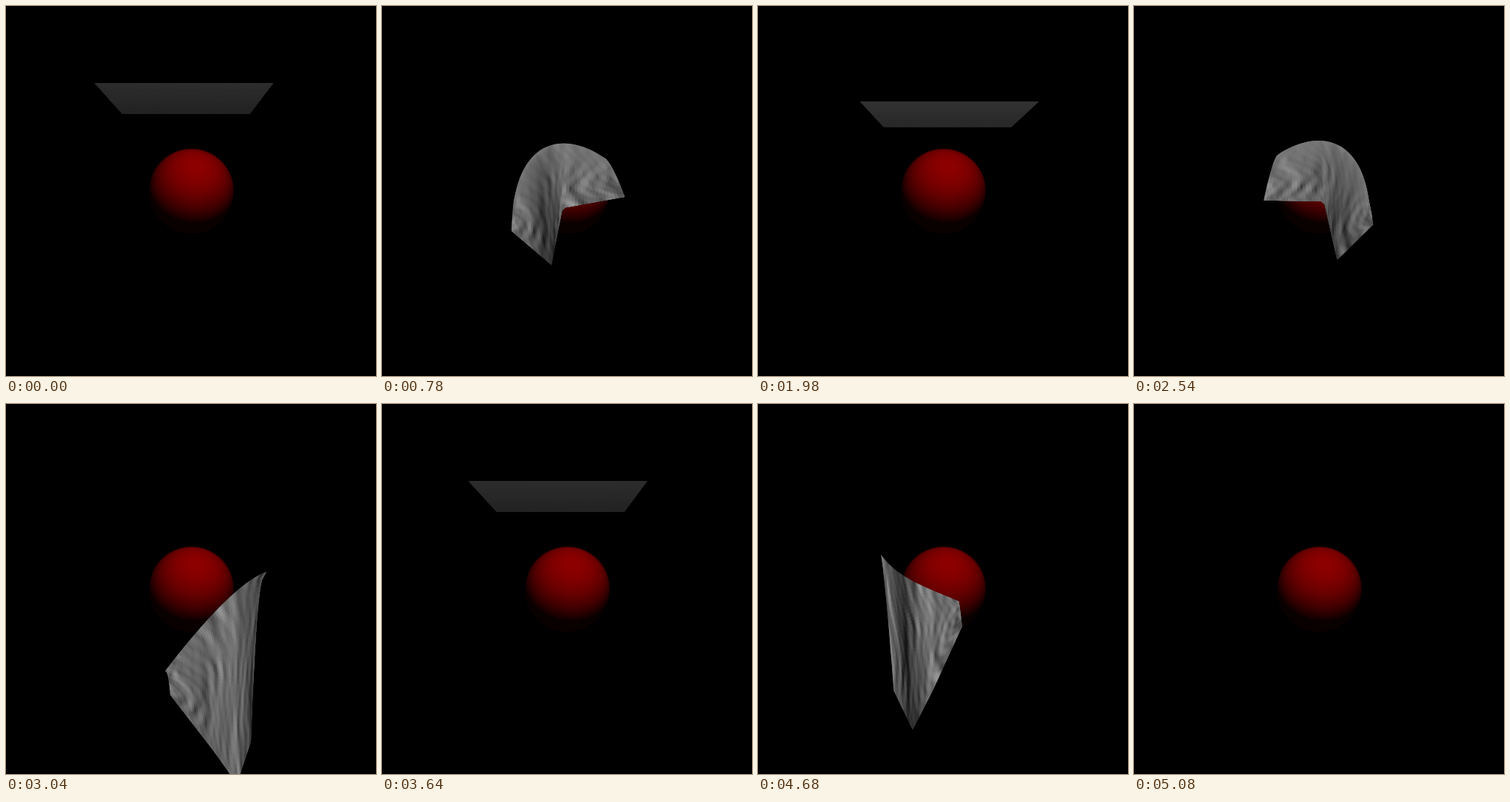
Animation of 500x500 px, one loop 5380 ms. Source, as an HTML page with a canvas:

```html
<!DOCTYPE html>
<html lang="en">
<head>
<meta charset="utf-8">
<title>Cloth over a sphere</title>
<style>
html, body { margin: 0; width: 100%; height: 100%; overflow: hidden; background: #000; }
canvas { display: block; width: 500px; height: 500px; }
</style>
</head>
<body>
<canvas id="stage" width="500" height="500"></canvas>
<script>
const ctx = document.getElementById('stage').getContext('2d');
const LOOP = 5380, STEP = 20, CONTACT = 283;
const COLS = 60, ROWS = 40;
const mix = (a, b, t) => a + (b - a) * t;

// A pose: Bezier top edge (4 points), angular hem (4 points) and
// look = [grey, shadow depth, shadow position, crest smoothness, fold depth, hang].
// Hang below 1 makes the cloth drop plumb before it reaches the hem.
const pose = (top, hem, look) => ({ pts: [...top, ...hem], look });

const drape = pose(
  [[183, 255], [195, 175], [262, 175], [326, 210]],
  [[183, 281], [206, 331], [240, 262], [303, 291]],
  [106, 18, 0.35, 0.8, 12, 0.6]);
const slide = pose(
  [[178, 265], [192, 175], [252, 172], [300, 205]],
  [[175, 304], [229, 350], [244, 273], [328, 258]],
  [114, 62, 0.38, 0.9, 15, 0.7]);
const fallLeft = pose(
  [[152, 240], [175, 285], [215, 300], [258, 317]],
  [[172, 442], [195, 497], [225, 443], [260, 350]],
  [112, 58, 0.3, 0, 16, 0.8]);
const fallRight = pose(
  [[215, 361], [240, 328], [310, 240], [352, 227]],
  [[222, 393], [280, 468], [312, 513], [331, 456]],
  [104, 30, 1, 0, 13, 0.4]);

function mirror({ pts, look }) {
  const flip = pts.map(([x, y]) => [500 - x, y]);
  return pose(flip.slice(0, 4).reverse(), flip.slice(4).reverse(),
    look.map((n, i) => i === 2 ? 1 - n : n));
}

// Scale a pose about one of its points, which moves to (x, y).
function place({ pts, look }, corner, x, y, scale) {
  const [ox, oy] = pts[corner];
  return { look, pts: pts.map(([px, py]) => [x + (px - ox) * scale, y + (py - oy) * scale]) };
}

// Level square sheet in free fall, seen in perspective from sphere height.
function flat(ms, offset, grey) {
  const s = ms / 1000, y = 812 * s * s - 121.7;
  const edge = scale => [-1, -1 / 3, 1 / 3, 1].map(u =>
    [250 + (offset + 100.8 * u) * scale, 250 + y * scale]);
  return pose(edge(1.2), edge(0.857), [grey, 0, 0.5, 0, 0, 1]);
}

function drop(start, end, offset, fallTime, toLeft) {
  const side = toLeft ? p => p : mirror;
  const fall = toLeft ? fallLeft : fallRight, corner = toLeft ? 0 : 3;
  const slip = toLeft ? place(fall, 0, 164, 200, 0.98) : place(fall, 3, 338, 178, 0.93);
  const gone = place(fall, corner, toLeft ? 60 : 444, 490, 1.3);
  return {
    start, end, offset,
    keys: [[CONTACT, flat(CONTACT, offset, 68)], [560, side(drape)], [780, side(slide)],
      [1070, slip], [fallTime, fall], [end - start - STEP, gone]]
  };
}
const drops = [
  drop(0, 1520, -8, 1180, true),
  drop(1820, 3360, 7.1, 1220, false),
  drop(3640, 5080, -10.4, 1160, true)
];

// Cubic through b and c, with slopes taken from the keys around them.
function ease([ta, a], [tb, b], [tc, c], [td, d], time) {
  const span = tc - tb, t = (time - tb) / span, t2 = t * t, t3 = t2 * t;
  const m = (c - a) / (tc - ta) * span, n = (d - b) / (td - tb) * span;
  return (2 * t3 - 3 * t2 + 1) * b + (t3 - 2 * t2 + t) * m +
    (3 * t2 - 2 * t3) * c + (t3 - t2) * n;
}

function poseAt(d, ms) {
  if (ms < CONTACT) return flat(ms, d.offset, 40 + ms * 0.035);
  const last = d.keys.length - 1;
  let i = 0;
  while (i < last - 1 && ms >= d.keys[i + 1][0]) i++;
  const near = [i - 1, i, i + 1, i + 2].map(k => d.keys[Math.min(last, Math.max(0, k))]);
  const blend = get => ease(...near.map(([t, p]) => [t, get(p)]), ms);
  return {
    pts: near[1][1].pts.map((_, k) => [0, 1].map(axis => blend(p => p.pts[k][axis]))),
    look: near[1][1].look.map((_, k) => blend(p => p.look[k]))
  };
}

function surface({ pts, look }, u, v) {
  const w = 1 - u, i = Math.min(2, Math.floor(u * 3));
  const top = axis => w ** 3 * pts[0][axis] + 3 * w * w * u * pts[1][axis] +
    3 * w * u * u * pts[2][axis] + u ** 3 * pts[3][axis];
  const hem = axis => mix(pts[4 + i][axis], pts[5 + i][axis], u * 3 - i);
  return [mix(top(0), hem(0), v ** look[5]), mix(top(1), hem(1), v)];
}

// Sharp creases: seeded folded waves, running mostly from crest to hem.
let seed = 11;
const random = () => (seed = seed * 16807 % 2147483647) / 2147483647;
const waves = Array.from({ length: 12 }, (_, i) => ({
  fu: 5 + i * 3 + 4 * random(), fv: (random() - 0.5) * (6 + 3 * i), phase: 6.28 * random()
}));
function folds(u, v) {
  const w = u + 0.03 * Math.sin(7 * v + 4 * u);
  return waves.reduce((sum, { fu, fv, phase }) =>
    sum + Math.abs(Math.sin(fu * w + fv * v + phase)) - 0.64, 0);
}
const creases = Array.from({ length: COLS }, (_, i) =>
  Array.from({ length: ROWS }, (_, j) => folds(i / COLS, j / ROWS)));

function shade([grey, dark, at, cap, fold], i, j) {
  const u = i / COLS, v = j / ROWS;
  const shadow = dark * Math.exp(-(((u - at) / 0.2) ** 2)) * mix(1, Math.sqrt(v), cap);
  const depth = fold * mix(1, Math.min(1, 0.2 + v), cap);
  const g = Math.round(grey - shadow + 10 * (0.5 - v) + depth * creases[i][j]);
  return Math.min(150, Math.max(22, g));
}

function drawCloth(p) {
  const grid = Array.from({ length: COLS + 1 }, (_, i) =>
    Array.from({ length: ROWS + 1 }, (_, j) => surface(p, i / COLS, j / ROWS)));
  // Each cell reaches under the next ones, so no seams show.
  for (let i = 0; i < COLS; i++) {
    for (let j = 0; j < ROWS; j++) {
      const right = grid[Math.min(i + 2, COLS)], left = grid[i], low = Math.min(j + 2, ROWS);
      const g = shade(p.look, i, j);
      ctx.fillStyle = `rgb(${g},${g},${g})`;
      ctx.beginPath();
      for (const point of [left[j], right[j], right[low], left[low]]) ctx.lineTo(...point);
      ctx.fill();
    }
  }
}

// Diffuse sphere lit from above the camera.
function makeSphere(r) {
  const c = document.createElement('canvas'), size = c.width = c.height = 120;
  const g = c.getContext('2d'), img = g.createImageData(size, size);
  for (let i = 0; i < size * size; i++) {
    const x = (i % size - 59.5) / r, y = (Math.floor(i / size) - 59.5) / r;
    const d = Math.hypot(x, y), z = Math.sqrt(Math.max(0, 1 - d * d));
    img.data[i * 4] = Math.max(9, 141 * (0.12 * x - 0.6 * y + 0.79 * z));
    img.data[i * 4 + 3] = 255 * Math.min(1, Math.max(0, (1 - d) * r + 0.5));
  }
  g.putImageData(img, 0, 0);
  return c;
}
const sphere = makeSphere(57.5);

function draw(t) {
  ctx.fillStyle = '#000';
  ctx.fillRect(0, 0, 500, 500);
  const d = drops.find(d => t >= d.start && t < d.end);
  const ms = d ? t - d.start : 0;
  const above = d && ms < CONTACT;
  if (above) drawCloth(poseAt(d, ms));
  ctx.drawImage(sphere, 190.5, 190.5);
  if (d && !above) drawCloth(poseAt(d, ms));
}

const begin = performance.now();
function tick() {
  const t = (performance.now() - begin) % LOOP;
  draw(Math.floor(t / STEP) * STEP);
  requestAnimationFrame(tick);
}
tick();
</script>
</body>
</html>
```
